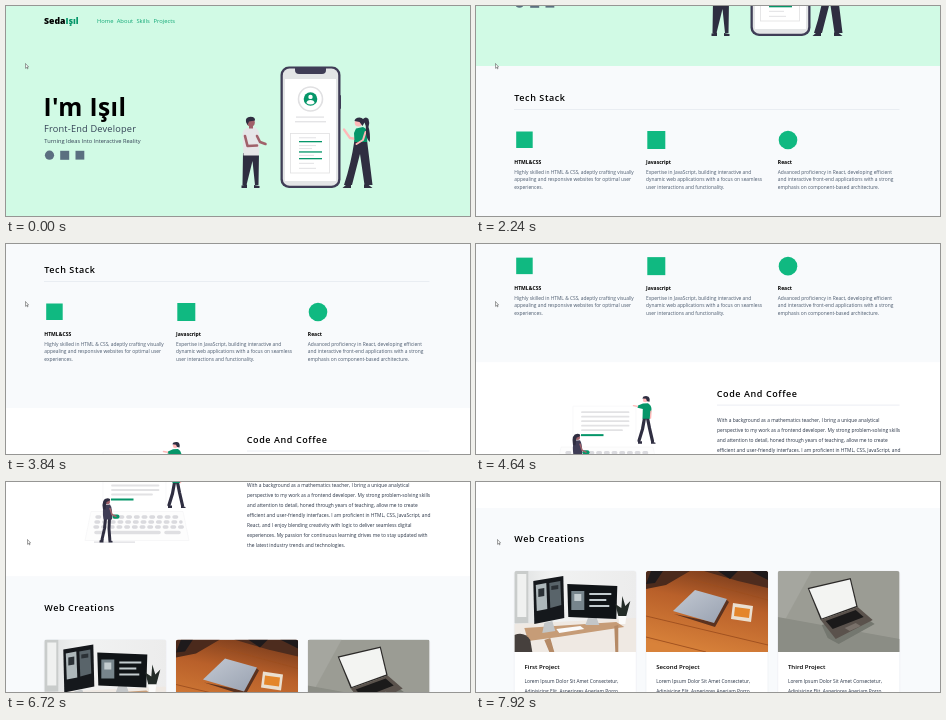
Recreate the animation shown at these times as an HTML page. Size 464 by 210 pixels, loop 8000 ms.

```html
<!DOCTYPE html>
<html lang="en">
<head>
<meta charset="utf-8">
<title>Portfolio</title>
<style>
  html, body { margin: 0; width: 100%; height: 100%; overflow: hidden; background: #f8fafc; }
  svg { display: block; }
  #stage { width: 464px; height: 210px; }
  text { font-family: "Open Sans", "Noto Sans", sans-serif; }
  .logo { font-size: 8.7px; font-weight: 800; }
  .nav { font-size: 5.8px; fill: #10a876; }
  .hero { font-size: 24.5px; font-weight: 700; letter-spacing: .4px; }
  .role { font-size: 9.2px; letter-spacing: .2px; fill: #334155; }
  .motto { font-size: 5.7px; fill: #334155; }
  .head { font-size: 9px; font-weight: 600; letter-spacing: .58px; }
  .skill { font-size: 5.05px; font-weight: 700; }
  .copy { font-size: 4.87px; fill: #4b5a6e; }
  .dark { fill: #273244; }
  .card { font-size: 6.1px; font-weight: 600; }
  .rule { stroke: #e6eaf0; stroke-width: .8; }
  .g { fill: #10b981; }
  .leaf { fill: #059669; }
  .ink { fill: #2f2e41; }
  .pale { fill: #e4e4e6; }
  .limb { fill: none; stroke-linecap: round; stroke-linejoin: round; }
</style>
</head>
<body>
<svg id="stage" viewBox="0 0 464 210">
  <defs>
    <clipPath id="photo"><path d="M0 81V2.5Q0 0 2.5 0H119.5Q122 0 122 2.5V81Z"/></clipPath>
    <linearGradient id="wood" x1=".7" y1="0" x2=".4" y2="1">
      <stop offset="0" stop-color="#7a3c1c"/><stop offset=".4" stop-color="#b9602a"/><stop offset="1" stop-color="#d8823a"/>
    </linearGradient>
    <linearGradient id="metal" x1="0" y1="0" x2="1" y2="1">
      <stop offset="0" stop-color="#c3c9d3"/><stop offset="1" stop-color="#98a1b0"/>
    </linearGradient>
    <linearGradient id="wall" x1="0" y1="0" x2="1" y2="0">
      <stop offset="0" stop-color="#dddfdf"/><stop offset=".3" stop-color="#f1f2f2"/><stop offset="1" stop-color="#ececec"/>
    </linearGradient>
  </defs>

  <g id="page">
    <rect width="464" height="212" fill="#d1fae5"/>
    <rect y="212" width="464" height="170" fill="#f8fafc"/>
    <rect y="382" width="464" height="150" fill="#fff"/>
    <rect y="532" width="464" height="240" fill="#f8fafc"/>

    <!-- hero -->
    <text class="logo" x="38" y="17.7">Seda<tspan class="leaf">Işıl</tspan></text>
    <g class="nav">
      <text x="91" y="16.6">Home</text><text x="110.7" y="16.6">About</text>
      <text x="130.4" y="16.6">Skills</text><text x="147.6" y="16.6">Projects</text>
    </g>
    <text class="hero" x="37.5" y="110.3">I'm Işıl</text>
    <text class="role" x="38" y="126">Front-End Developer</text>
    <text class="motto" x="38.3" y="136.6">Turning Ideas Into Interactive Reality</text>
    <g fill="#5b6f80">
      <circle cx="43.5" cy="149.2" r="4.6"/>
      <rect x="54.2" y="144.8" width="9" height="9"/>
      <rect x="69.5" y="144.8" width="8.8" height="8.8"/>
    </g>

    <!-- phone -->
    <rect x="333" y="89" width="2" height="14" rx="1" fill="#3f3d56"/>
    <rect x="274.5" y="60.5" width="60" height="121.5" rx="8.5" fill="#3f3d56"/>
    <rect x="276.8" y="62.6" width="55.4" height="117.2" rx="6.8" fill="#e3e5e6"/>
    <rect x="279" y="73" width="51" height="102" fill="#fff"/>
    <path d="M289 61H320V64Q320 68 316 68H293Q289 68 289 64Z" fill="#3f3d56"/>
    <circle cx="304.5" cy="93" r="12" fill="#fff" stroke="#e0e0e2" stroke-width="1.6"/>
    <circle cx="304.5" cy="93" r="6.8" class="leaf"/>
    <circle cx="304.5" cy="90.9" r="2.2" fill="#fff"/>
    <path d="M300.4 97Q300.8 94 304.5 94T308.6 97Q306.8 98.5 304.5 98.5T300.4 97Z" fill="#fff"/>
    <rect x="290" y="110.4" width="28" height="1.4" class="pale"/>
    <rect x="289" y="115" width="31" height="1.4" class="pale"/>
    <rect x="284.5" y="127.5" width="39" height="39.5" fill="#fff" stroke="#e0e0e2" stroke-width=".8"/>
    <g class="pale">
      <rect x="293" y="131.2" width="17" height="1.1"/><rect x="293" y="139" width="17" height="1.1"/>
      <rect x="293" y="142" width="13" height="1.1"/><rect x="293" y="148.8" width="15" height="1.1"/>
      <rect x="293" y="156.8" width="15" height="1.1"/><rect x="293" y="161.8" width="17" height="1.1"/>
    </g>
    <g class="leaf">
      <rect x="293" y="135" width="23" height="1.3"/><rect x="293" y="145.3" width="23" height="1.3"/>
      <rect x="293" y="152" width="23" height="1.3"/>
    </g>

    <!-- man by the phone -->
    <path class="ink" d="M237 147H253L252.5 179H249L246.5 155L240.5 179H236.5Z"/>
    <path class="ink" d="M235.5 182V179.5L241 178.5V182ZM248 182V179L253.5 180V182Z"/>
    <path d="M241 122L248 121Q253 123 253.5 129L253 149.5H237.5L236.5 128Q237 123 241 122Z" fill="#e6e6e8"/>
    <path class="limb" d="M239 130L241.5 140L251 139.5M251 130L254 136L259.5 138" stroke="#a0616a" stroke-width="2.6"/>
    <path d="M243 117H247V122.5H243Z" fill="#a0616a"/>
    <circle cx="244.8" cy="116.5" r="4" fill="#a0616a"/>
    <path class="ink" d="M240 116Q239 111 244.5 110.8Q249.5 111 249 114.5L243 115.5L241.5 119Z"/>

    <!-- woman by the phone -->
    <path class="ink" d="M348.5 134H361L366.5 179H358.5L354 148L346 179H338Q345 158 348.5 134Z"/>
    <path class="ink" d="M336.5 182L341 178H345V182ZM358 182V178.5H362L366.5 182Z"/>
    <path class="limb" d="M350 133L344 132L338 123.5" stroke="#ffb8b8" stroke-width="2.3"/>
    <path class="leaf" d="M350 122.5L357 121Q362 123 361.5 128L361 136H348.5L348 127Z"/>
    <path class="limb" d="M359.5 126L357 134L350.5 138" stroke="#ffb8b8" stroke-width="2"/>
    <circle cx="352.5" cy="116.8" r="3.8" fill="#ffb8b8"/>
    <path class="ink" d="M348.5 115Q349 111.5 353.5 111.5Q356 111.5 357 113Q360 110 362.5 113Q364 117 362.5 121Q364.5 127 363.8 136Q359.5 132 360 125Q360.5 120 358.5 116.5L356.5 120L353.5 116Z"/>

    <!-- tech stack -->
    <text class="head" x="38.3" y="247.3">Tech Stack</text>
    <path class="rule" d="M38 255.5H423.5"/>
    <rect class="g" x="40.2" y="277.5" width="16.5" height="16.5"/>
    <rect class="g" x="171.3" y="277" width="18" height="18"/>
    <circle class="g" cx="312" cy="286" r="9.3"/>
    <g class="skill">
      <text x="38.3" y="309.7">HTML&amp;CSS</text><text x="170" y="309.7">Javascript</text><text x="301.8" y="309.7">React</text>
    </g>
    <text class="copy" y="319.7">
      <tspan x="38.3">Highly skilled in HTML &amp; CSS, adeptly crafting visually</tspan>
      <tspan x="38.3" dy="7.6">appealing and responsive websites for optimal user</tspan>
      <tspan x="38.3" dy="7.6">experiences.</tspan>
    </text>
    <text class="copy" y="319.7">
      <tspan x="170">Expertise in JavaScript, building interactive and</tspan>
      <tspan x="170" dy="7.6">dynamic web applications with a focus on seamless</tspan>
      <tspan x="170" dy="7.6">user interactions and functionality.</tspan>
    </text>
    <text class="copy" y="319.7">
      <tspan x="301.8">Advanced proficiency in React, developing efficient</tspan>
      <tspan x="301.8" dy="7.6">and interactive front-end applications with a strong</tspan>
      <tspan x="301.8" dy="7.6">emphasis on component-based architecture.</tspan>
    </text>

    <!-- about -->
    <text class="head" x="240.8" y="416.5">Code And Coffee</text>
    <path class="rule" d="M241 425H423.5"/>
    <text class="copy dark" y="442">
      <tspan x="241">With a background as a mathematics teacher, I bring a unique analytical</tspan>
      <tspan x="241" dy="10.12">perspective to my work as a frontend developer. My strong problem-solving skills</tspan>
      <tspan x="241" dy="10.12">and attention to detail, honed through years of teaching, allow me to create</tspan>
      <tspan x="241" dy="10.12">efficient and user-friendly interfaces. I am proficient in HTML, CSS, JavaScript, and</tspan>
      <tspan x="241" dy="10.12">React, and I enjoy blending creativity with logic to deliver seamless digital</tspan>
      <tspan x="241" dy="10.12">experiences. My passion for continuous learning drives me to stay updated with</tspan>
      <tspan x="241" dy="10.12">the latest industry trends and technologies.</tspan>
    </text>

    <!-- keyboard scene -->
    <path d="M97 463V426H160V463" fill="none" stroke="#f5f5f6" stroke-width=".7"/>
    <path class="limb" d="M106 432H152.500M106 436.500H152.500M106 441H152.500M106 445.500H152.500M106 450H146" stroke="#e2e2e4" stroke-width="1.8"/>
    <rect class="leaf" x="105" y="454" width="22.5" height="2"/>
    <path d="M85 467H177L183 496H79Z" fill="#fdfdfd" stroke="#f4f4f5" stroke-width=".6"/>
    <path class="limb" d="M91 472.500H174M90 477.500H175M89 482.500H178" stroke="#dadade" stroke-width="3.4" stroke-dasharray="2.600 5.100"/>
    <path class="limb" d="M90 488H98M105 488H153M160 488H173" stroke="#dfdfe2" stroke-width="3.6"/>
    <path d="M88 497.600H129" stroke="#b9b9c2" stroke-width=".6"/>
    <rect class="leaf" x="106.500" y="470" width="7" height="4.200" rx="2"/>

    <path class="limb" d="M168.500 438L166.500 449L163 460.500M171.500 438L173.500 448L176.500 461" stroke="#2f2e41" stroke-width="3.2"/>
    <path class="ink" d="M162 463.500V461L166 461V463.500ZM175 463.500V461L179.500 462.500V463.500Z"/>
    <path class="leaf" d="M167 423.300L172 423Q175.500 425 175.500 429L174 438.500H166.500L166.800 428.800L161.500 427.500L162 425.400Z"/>
    <path class="limb" d="M161.500 426.300L157.500 425.500M175 431L174.500 438" stroke="#ffb8b8" stroke-width="1.4"/>
    <circle cx="169.200" cy="419.800" r="2.400" fill="#ffb8b8"/>
    <path class="ink" d="M166.300 418.300Q167 415.600 171 416Q174.500 416.500 173.500 421.500L171 421L170 418.700Z"/>

    <path class="limb" d="M99.500 474L98.500 484L96 495M103.500 474L103 484L103.800 495" stroke="#2f2e41" stroke-width="3"/>
    <path d="M98 460.500L104 460Q106.500 463 106 475H97.500Q96 466 98 460.500Z" fill="#3f3d56"/>
    <path class="limb" d="M104 464L106 470L110 472" stroke="#a0616a" stroke-width="1.5"/>
    <path class="ink" d="M93.500 498V496L97.500 494.500V498ZM102.500 498V495L106.500 496.500V498Z"/>
    <circle cx="101.500" cy="457.300" r="2.500" fill="#a0616a"/>
    <path class="ink" d="M97 465Q95 454 101.500 453.700Q105 454 104 456L100.500 457.500L99.500 465Z"/>

    <!-- projects -->
    <text class="head" x="38.3" y="566.2">Web Creations</text>
    <g fill="#fff" stroke="#edf0f4" stroke-width=".7">
      <rect x="38.3" y="595" width="122" height="170" rx="2.5"/>
      <rect x="170" y="595" width="122" height="170" rx="2.5"/>
      <rect x="301.7" y="595" width="122" height="170" rx="2.5"/>
    </g>

    <g transform="translate(38.3 595)"><g clip-path="url(#photo)">
      <rect width="122" height="81" fill="url(#wall)"/>
      <path d="M0 0H14V52H0Z" fill="#c9cccb"/>
      <path d="M3 3H12V46H3Z" fill="#f0f1f0"/>
      <path d="M0 53L122 47V81H0Z" fill="#efe9e3"/>
      <path d="M10 57L102 51L110 56L44 66L14 70Z" fill="#c69c77"/>
      <path d="M30 52L38 50L41 60L28 62ZM74 46H82L85 54H71Z" fill="#c3c6c8"/>
      <path d="M19 10L49 5L50 47L20 53Z" fill="#15181c"/>
      <path d="M21.5 14L32 12L33 38L22.500 40Z" fill="#aeb8bb"/>
      <path d="M35 12L46 10L47 34L36 37Z" fill="#59646a"/>
      <path d="M24 18L30 17V25L24 26ZM37 15L44 14V18L37 19Z" fill="#2b3136"/>
      <path d="M53 13L103 15L102 48L54 46Z" fill="#101417"/>
      <path d="M57 20H70V39H57Z" fill="#77858c"/>
      <path d="M75 22H97V24H75ZM75 28H92V30H75ZM75 34H95V36H75ZM60 23H67V30H60Z" fill="#c3cccf"/>
      <path d="M104 45L101 33L107 37L108 25L111 35L116 30L112 45Z" fill="#242c28"/>
      <path d="M104 45H112L111 53H105Z" fill="#fbfbfa"/>
      <path d="M42 58L66 55L70 58L45 62Z" fill="#fafafa"/>
      <path d="M0 64Q10 60 16 69L18 81H0Z" fill="#46403d"/>
      <path d="M30 69L36 67L40 81H35ZM100 55L104 54V81H101Z" fill="#b58a66"/>
    </g></g>

    <g transform="translate(170 595)"><g clip-path="url(#photo)">
      <rect width="122" height="81" fill="url(#wood)"/>
      <path d="M0 0H44L20 14L0 18Z" fill="#4b2a1c"/>
      <path d="M58 0H122V17L92 10Z" fill="#4d2c1e"/>
      <path d="M72 0H92L84 8ZM104 0H122V9ZM5 0H17L9 12L0 13Z" fill="#1e1a1c"/>
      <path d="M0 45L122 74M0 66L60 81M44 8L122 29" stroke="#9d4f1f" stroke-width=".9"/>
      <path d="M28 43L69 56L83 31L80 28L67 51Z" fill="#5b321f"/>
      <path d="M27 40L49 19L81 28L68 52Z" fill="url(#metal)"/>
      <path d="M87 32L107 35L105 51L85 48Z" fill="#eadfd0"/>
      <path d="M89 36L104 38L103 47L88 45Z" fill="#e4862b"/>
    </g></g>

    <g transform="translate(301.7 595)"><g clip-path="url(#photo)">
      <rect width="122" height="81" fill="#9b9c94"/>
      <path d="M0 0H34L0 62Z" fill="#a5a69f"/>
      <path d="M0 46L122 68V81H0Z" fill="#8b8d85"/>
      <path d="M44 54L82 43L97 53L61 73L50 67Z" fill="#74776f"/>
      <path d="M30 17L73 7L80 36L43 49Z" fill="#2b2928"/>
      <path d="M31.500 18L72.200 8.500L78.500 35L44 47.500Z" fill="#f3f4f2"/>
      <path d="M43 49L80 36L95 49L58 68Z" fill="#5a524c"/>
      <path d="M48 50L78 39L86 46L55 58Z" fill="#1b1a1a"/>
      <path d="M67 57L78 52L83 55L72 60Z" fill="#79716a"/>
    </g></g>

    <g id="cards"></g>
  </g>

  <path id="cursor" d="M19.5 57.500V62.300L20.600 61.300L21.300 62.900L22 62.600L21.300 61H22.600Z" fill="#fff" stroke="#333" stroke-width=".45"/>
</svg>
<script>
  const LOOP = 8000, STEP = 80;
  // wheel moves: start ms, end ms, scroll offset reached
  const moves = [
    [160, 400, 34], [640, 860, 50], [1100, 1400, 84], [1480, 1780, 118], [1900, 2200, 152],
    [2610, 2900, 186], [3540, 3800, 218], [4100, 4400, 252], [4600, 4900, 286], [5150, 5450, 320],
    [5600, 5860, 354], [5940, 6160, 385], [6200, 6680, 437.5], [6950, 7250, 472], [7500, 7800, 506]
  ];
  const page = document.getElementById("page");
  const cursor = document.getElementById("cursor");

  document.getElementById("cards").innerHTML = ["First", "Second", "Third"].map((name, i) => {
    const x = 48.5 + i * 131.7;
    return `<text class="card" x="${x}" y="692.6">${name} Project</text>
      <text class="copy dark" y="706.7"><tspan x="${x}">Lorem Ipsum Dolor Sit Amet Consectetur,</tspan>
      <tspan x="${x}" dy="10.1">Adipisicing Elit. Asperiores Aperiam Porro</tspan></text>`;
  }).join("");

  function scrollAt(t) {
    let y = 0;
    for (const [from, to, target] of moves) {
      if (t <= from) break;
      const k = Math.min(1, (t - from) / (to - from));
      y += (target - y) * (1 - (1 - k) ** 3);
    }
    return y;
  }

  const start = performance.now();
  function draw() {
    const now = Math.max(0, performance.now() - start) % LOOP;
    const t = Math.floor(now / STEP) * STEP;
    page.setAttribute("transform", `translate(0 ${-scrollAt(t)})`);
    cursor.setAttribute("transform", `translate(${t < 6400 ? 0 : 2} 0)`);
    requestAnimationFrame(draw);
  }
  draw();
</script>
</body>
</html>
```
